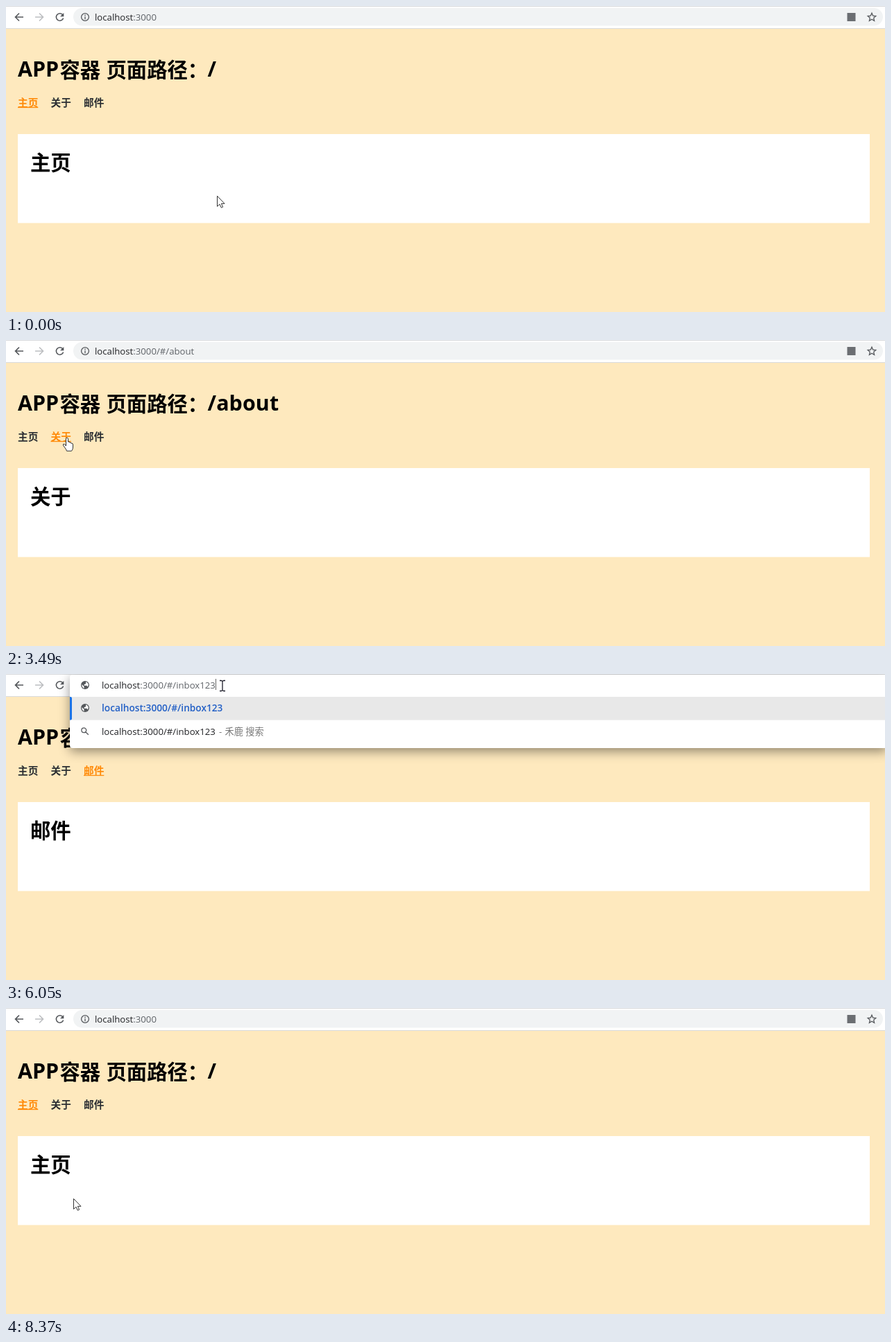
Animation of 1267 by 442 pixels, one loop 8500 ms. Source, as an HTML page:

```html
<!DOCTYPE html>
<html lang="zh-CN">
<head>
<meta charset="utf-8">
<style>
  html, body { margin: 0; width: 1267px; height: 442px; overflow: hidden; background: #fee9be; }
  svg { display: block; }
  text { font-family: "Open Sans", "Noto Sans CJK SC", "Noto Sans CJK", sans-serif; white-space: pre; }
  .cjk { font-family: "Noto Sans CJK SC", "Noto Sans CJK", sans-serif; }
  .title { font-size: 29.33px; font-weight: 700; }
  .latin { font-size: 30.4px; font-weight: 700; }
  .link { font-size: 14.67px; font-weight: 700; }
  .url { font-size: 13.2px; fill: #202124; }
  .dim { fill: #5f6368; }
  .icon { fill: none; stroke: #55585c; stroke-width: 1.6; }
  .thin { stroke-width: 1.3; }
  #drop .panel { filter: drop-shadow(0 5px 8px rgba(0, 0, 0, .42)); }
</style>
</head>
<body>
<svg width="1267" height="442" viewBox="0 0 1267 442">
  <defs>
    <g id="globe">
      <circle r="6" fill="#55585c"/>
      <path d="M-4.8-1L-1.5 2V4.8Q-4.6 3.5-4.8-1ZM1-4.7Q4.5-3.6 4.8 0L3.6 2.6 2.6.8H-1.4V-1L1-1.8Z" fill="#fff"/>
    </g>
  </defs>
  <rect width="1267" height="442" fill="#fee9be"/>

  <text class="latin" x="17" y="102">APP</text>
  <text class="title cjk" x="77.5" y="102.5">容器</text>
  <text class="title cjk" x="144.5" y="102.5">页面路径：</text>
  <text class="latin" id="path" x="290.5" y="102" letter-spacing=".1"></text>
  <g id="links"></g>

  <g id="view">
    <rect x="17" y="185" width="1228" height="128.5" fill="#fff"/>
    <text class="title cjk" id="name" x="35" y="236.5"></text>
  </g>
  <g id="missing">
    <text class="latin" x="35" y="235.5" style="font-size:31.5px">404</text>
    <rect id="button" x="35" y="263.5" width="91.5" height="33" rx="4"/>
    <text class="cjk" x="81" y="286" text-anchor="middle" font-size="15.6" fill="#212529">返回首页</text>
  </g>

  <rect width="1267" height="33" fill="#fff"/>
  <path d="M0 .5H1267M0 32.5H1267" stroke="#d8dadd"/>
  <path class="icon" d="M25 16H14M19 10.5L13.5 16 19 21.5"/>
  <path class="icon" d="M42 16H53M48 10.5L53.5 16 48 21.5" style="stroke:#bcbec1"/>
  <path class="icon" d="M81.5 12.5A5.2 5.2 0 1 0 82.6 17.5"/>
  <path d="M83.3 10V15.3H78Z" fill="#55585c"/>

  <g id="bar">
    <rect id="pill" x="97" y="3" width="1167" height="25.5" rx="12.75" stroke-width="2"/>
    <circle class="icon thin" cx="114" cy="16" r="5.4"/>
    <path class="icon thin" d="M114 12.6V14.2M114 15.2V19.2"/>
    <rect x="1212.5" y="10" width="12" height="12" fill="#6b6e72"/>
    <path class="icon thin" d="M1248 10.2L1249.7 14.1 1253.8 14.5 1250.7 17.3 1251.6 21.4 1248 19.2 1244.4 21.4 1245.3 17.3 1242.2 14.5 1246.3 14.1Z"/>
    <g id="code">
      <path class="icon thin" d="M1183.5 13V10H1187M1192 10H1195.5V13M1195.5 19V22H1192M1187 22H1183.5V19"/>
      <path d="M1185.5 12h3.4v3.4h-3.4zM1190.3 12h3.4v3.4h-3.4zM1185.5 16.7h3.4v3.4h-3.4zM1190.3 16.7h3.4v3.4h-3.4z" fill="#55585c"/>
    </g>
  </g>

  <g id="drop">
    <rect class="panel" x="92" y="1" width="1178" height="106" rx="4" fill="#fff"/>
    <rect x="92" y="33" width="1175" height="33.5" fill="#e8e8e8"/>
    <path d="M92 33h1q2 0 2 2v29.5q0 2-2 2h-1z" fill="#1a73e8"/>
    <use href="#globe" x="114" y="16"/>
    <use href="#globe" x="114" y="49"/>
    <path class="icon thin" d="M114.8 83.8L118.8 87.8M115.7 81.3a3.4 3.4 0 1 1-6.8 0a3.4 3.4 0 1 1 6.8 0"/>
    <text class="url" id="best" x="138" y="54" style="font-size:13.7px;font-weight:600;fill:#2360c6"></text>
    <text class="url" x="138" y="88"><tspan id="query"></tspan><tspan fill="#777" dx="5">- </tspan><tspan fill="#777" dx="1">禾鹿 搜索</tspan></text>
  </g>
  <text class="url" id="url" y="20.5">localhost<tspan class="dim" id="rest"></tspan></text>
  <rect id="caret" y="7" width="1" height="16" fill="#666"/>

  <g id="cursor" stroke-linejoin="round">
    <path id="arrow" d="M.5 .5V15.5L4 12.3 6.3 17.3 8.6 16.3 6.4 11.4H11Z" fill="#fff" stroke="#333"/>
    <path id="hand" d="M-1.5 12V1.5Q-1.5 .3 0 .3T1.5 1.5V6Q4 5.5 4 7.3Q6.4 6.6 6.4 8.4Q8.5 8 8.5 10V14Q8.5 17 6.5 19.3H-.5Q-1 17-3.5 14L-5.6 11Q-6 8.5-3.5 9.5Z" fill="#fff" stroke="#333"/>
    <path id="beam" d="M-4-7.5H-1.5L0-6.5 1.5-7.5H4M0-6.5V6.5M-4 7.5H-1.5L0 6.5 1.5 7.5H4" fill="none" stroke="#1b1b28" stroke-width="1.3"/>
  </g>
</svg>
<script>
const LOOP = 8500;
const $ = id => document.getElementById(id);
const show = (id, on) => $(id).style.display = on ? '' : 'none';

const tabs = [
  { name: '主页', path: '/', x: 17 },
  { name: '关于', path: '/about', x: 64.5 },
  { name: '邮件', path: '/inbox', x: 112 }
];
$('links').innerHTML = tabs.map(({ name, x }) =>
  `<g><text class="link cjk" x="${x}" y="145">${name}</text><path d="M${x} 146.5H${x + 29.3}" stroke="#ff8b0a" stroke-width="1.3"/></g>`).join('');

// start time, tab index (-1: no such page)
const visits = [[0, 0], [980, 1], [1720, 2], [2810, 0], [3420, 1], [3890, 2], [6380, -1], [7630, 0]];
const typing = [[5720, '1'], [5850, '12'], [6050, '123']];
// time, x, y of the pointer's hot spot
const moves = [
  [0, 304, 274], [20, 304, 274], [560, 2, 142], [910, 80, 141], [1150, 80, 141], [1450, 137, 140],
  [2130, 137, 140], [2320, 23, 141], [2450, 23, 141], [2540, 17, 141], [2980, 18, 141], [3300, 88, 141],
  [3640, 88, 141], [3850, 137, 140], [4120, 137, 140], [4960, 312, 17], [6680, 312, 17],
  [7000, 290, 73], [7520, 104, 285], [7700, 104, 285], [8040, 95, 279], [8369, 95, 279], [8370, 97, 275], [LOOP, 97, 275]
];

const latest = (list, t) => list.filter(e => e[0] <= t).pop();

function pointer(t) {
  const i = moves.findIndex(m => m[0] > t);
  const [a, b] = [moves[i - 1], moves[i]];
  const p = (t - a[0]) / (b[0] - a[0]), k = p * p * (3 - 2 * p);
  return [1, 2].map(n => Math.round(a[n] + (b[n] - a[n]) * k));
}

function draw(t) {
  const tab = latest(visits, t)[1], lost = tab < 0;
  const path = lost ? '/inbox123' : tabs[tab].path;
  const typed = t < 6380 && latest(typing, t);
  const focus = t >= 5050 && t < 6380;
  const [x, y] = pointer(t);

  $('path').textContent = path;
  [...$('links').children].forEach((g, i) => {
    g.firstChild.setAttribute('fill', i === tab ? '#ff8b0a' : '#2b2f33');
    g.lastChild.style.display = i === tab ? '' : 'none';
  });
  show('view', !lost);
  show('missing', lost);
  if (!lost) $('name').textContent = tabs[tab].name;

  const overBar = y < 31 && x > 97;
  const overButton = t >= 6380 && t < 8370 && x > 35 && x < 127 && y > 263 && y < 297;
  const overLink = y > 130 && y < 151 && tabs.some(l => x >= l.x && x <= l.x + 30);
  const overTitle = y > 70 && y < 112 && x < 391;
  $('button').setAttribute('fill', overButton ? '#e2e6ea' : '#f8f9fa');
  $('pill').setAttribute('fill', focus ? '#fff' : overBar ? '#eceef0' : '#f1f3f4');
  $('pill').setAttribute('stroke', focus ? '#3b7ae4' : 'none');

  const rest = ':3000' + (path === '/' ? '' : '/#' + path) + (typed ? typed[1] : '');
  const left = typed ? 138 : 128;
  $('rest').textContent = rest;
  $('url').setAttribute('x', left);
  $('best').textContent = $('query').textContent = 'localhost' + rest;
  show('bar', !typed);
  show('code', focus);
  show('drop', typed);
  show('caret', typed || (t >= 5050 && t < 5250));
  $('caret').setAttribute('x', Math.round(left + $('url').getComputedTextLength()));

  const kind = overButton || overLink ? 'hand' : overBar || overTitle ? 'beam' : 'arrow';
  ['hand', 'beam', 'arrow'].forEach(id => show(id, id === kind));
  $('cursor').setAttribute('transform', `translate(${x} ${y})`);
}

function tick() {
  draw(performance.now() % LOOP);
  requestAnimationFrame(tick);
}
tick();
</script>
</body>
</html>
```
